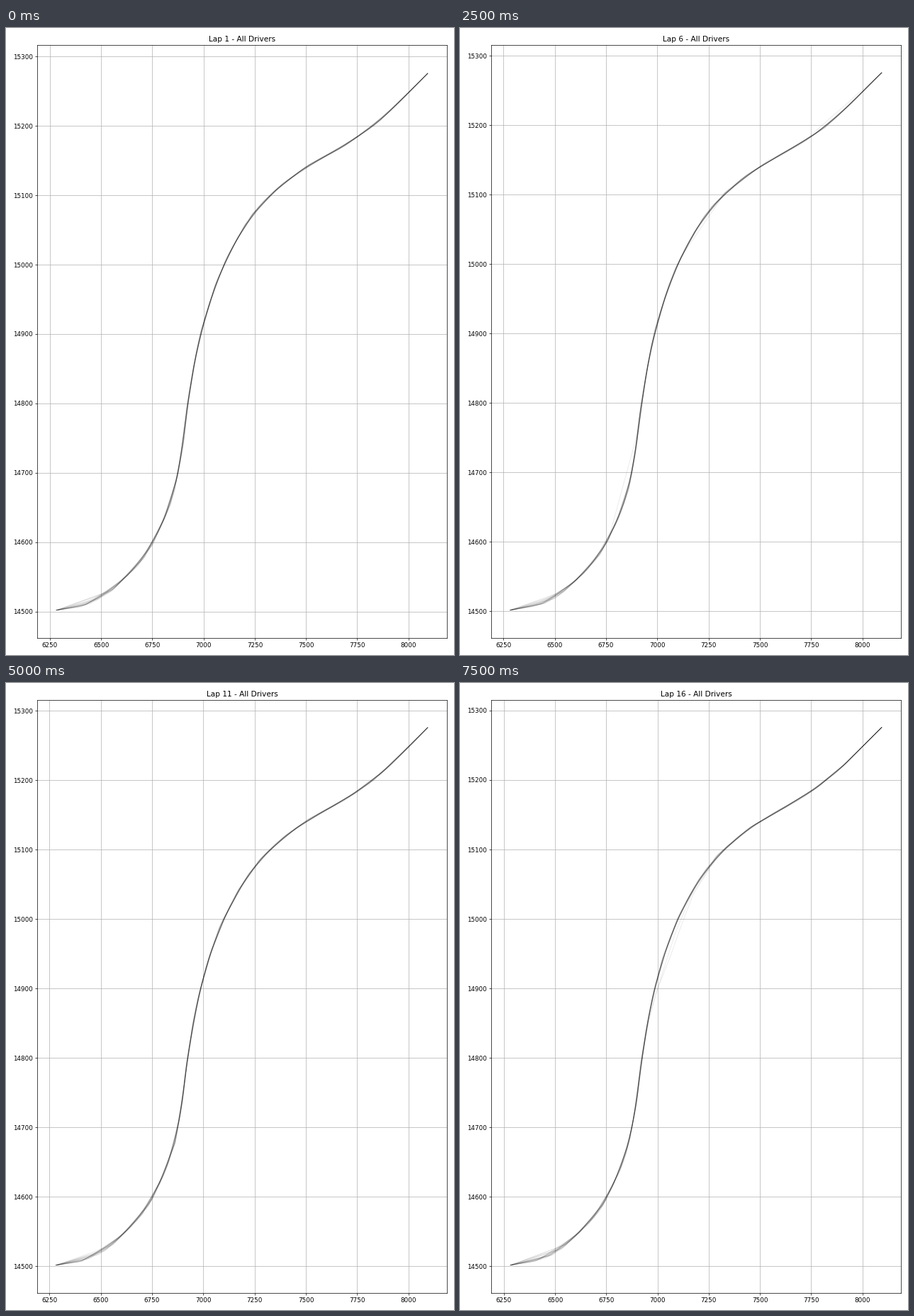
A matplotlib script that plays this animation: 632x885 px, repeating every 8 s.

```python
import numpy as np
import matplotlib.pyplot as plt
from matplotlib.animation import FuncAnimation
from matplotlib.collections import LineCollection

LAPS, DRIVERS, STEP_MS = 16, 20, 500
W, H, DPI = 632, 885, 63.2
PX = np.array([0.289, 0.9795])  # pixels per data unit

# Key points of the racing line
KNOTS = np.array([
    (6280, 14501.7), (6402, 14509.2), (6500, 14521.5), (6600, 14545),
    (6674, 14567), (6736, 14592), (6788, 14622), (6840, 14660),
    (6885, 14717), (6924, 14800), (6988, 14901), (7104, 15002),
    (7177, 15043), (7250, 15075), (7402, 15119.5), (7502, 15140.5),
    (7703, 15175), (7824, 15200), (8000, 15248), (8095, 15276)])

# Axis limits drift slightly between laps
KEY_LAPS = [1, 4, 6, 9, 12, 14, 16]
X_LO = [6187.4, 6189, 6189.2, 6189, 6189.2, 6187.6, 6187.6]
Y_HI = [15316.9, 15316.2, 15315.8, 15316.2, 15315.4, 15316, 15315.4]
X_HI, Y_LO = 8188.6, 14461.9

# Lost signal: a driver's line runs straight between two heights
GAPS = {6: [(14603, 14760), (15012, 15102), (15176, 15276)],
        9: [(14502, 14543), (14517, 14597), (14547, 14650), (15150, 15250)],
        14: [(14530, 14727)]}
# Drivers running wide: sideways shift at the apex
WIDE = {16: [36, 22]}


def smooth(pts, n=24):
    """Hermite curve through pts, parameterised by chord length."""
    t = np.r_[0, np.cumsum(np.hypot(*(np.diff(pts, axis=0) * PX).T))]
    m = np.gradient(pts, t, axis=0)
    u = np.linspace(0, 1, n, endpoint=False)[:, None]
    parts = []
    for p, q, mp, mq, h in zip(pts, pts[1:], m, m[1:], np.diff(t)):
        parts.append((1 + 2 * u) * (1 - u) ** 2 * p + u * (1 - u) ** 2 * h * mp
                     + u * u * (3 - 2 * u) * q + u * u * (u - 1) * h * mq)
    return np.vstack(parts + [pts[-1:]])


LINE = smooth(KNOTS)
ARC = np.r_[0, np.cumsum(np.hypot(*(np.diff(LINE, axis=0) * PX).T))]


def at(s):
    return np.c_[np.interp(s, ARC, LINE[:, 0]), np.interp(s, ARC, LINE[:, 1])]


def trace(rng, gap=None, shift=0):
    """One driver's sparse samples along the racing line."""
    s = np.cumsum(rng.uniform(44, 64, 40)) - rng.uniform(0, 50)
    s = s[(s > 28) & (s < ARC[-1] - 28)]
    if gap:
        a, b = np.interp(gap, LINE[:, 1], ARC)
        s = np.unique(np.r_[s[(s < a) | (s > b)], a, b])
    mid = at(s)
    # Push samples outwards so that the chords average to the line
    mid += 0.67 * (mid - (at(s - 27) + at(s + 27)) / 2) * (
        (s > 27) & (s < ARC[-1] - 27))[:, None]
    mid += rng.normal(0, 1, mid.shape) * (1.6, 0.4)
    mid[:, 0] += shift * np.exp(-((mid[:, 1] - 14965) / 75) ** 2)
    pts = np.vstack([at(0), mid, at(ARC[-1])])
    pts[0, 0] += rng.uniform(-2, 5)
    return pts


def lap_traces(lap):
    rng = np.random.default_rng(100 + lap)
    gaps, shifts = GAPS.get(lap, []), WIDE.get(lap, [])
    gaps = gaps + [None] * (DRIVERS - len(gaps))
    shifts = shifts + [0] * (DRIVERS - len(shifts))
    return [trace(rng, g, d) for g, d in zip(gaps, shifts)]


fig = plt.figure(figsize=(W / DPI, 14.0033), dpi=DPI)
ax = fig.add_axes([43.8 / W, 24.2 / H, 578.4 / W, 837 / H])
ax.grid(True)
ax.set_xticks(range(6250, 8001, 250))
ax.set_yticks(range(14500, 15301, 100))
title = ax.set_title("")
traces = ax.add_collection(
    LineCollection([], colors="black", linewidths=0.85, alpha=0.1, zorder=2))


def draw(i):
    lap = i + 1
    title.set_text(f"Lap {lap} - All Drivers")
    traces.set_segments(lap_traces(lap))
    ax.set_xlim(np.interp(lap, KEY_LAPS, X_LO), X_HI)
    ax.set_ylim(Y_LO, np.interp(lap, KEY_LAPS, Y_HI))
    return title, traces


anim = FuncAnimation(fig, draw, frames=LAPS, interval=STEP_MS,
                     repeat=True, repeat_delay=0, blit=False)
plt.show()
```
